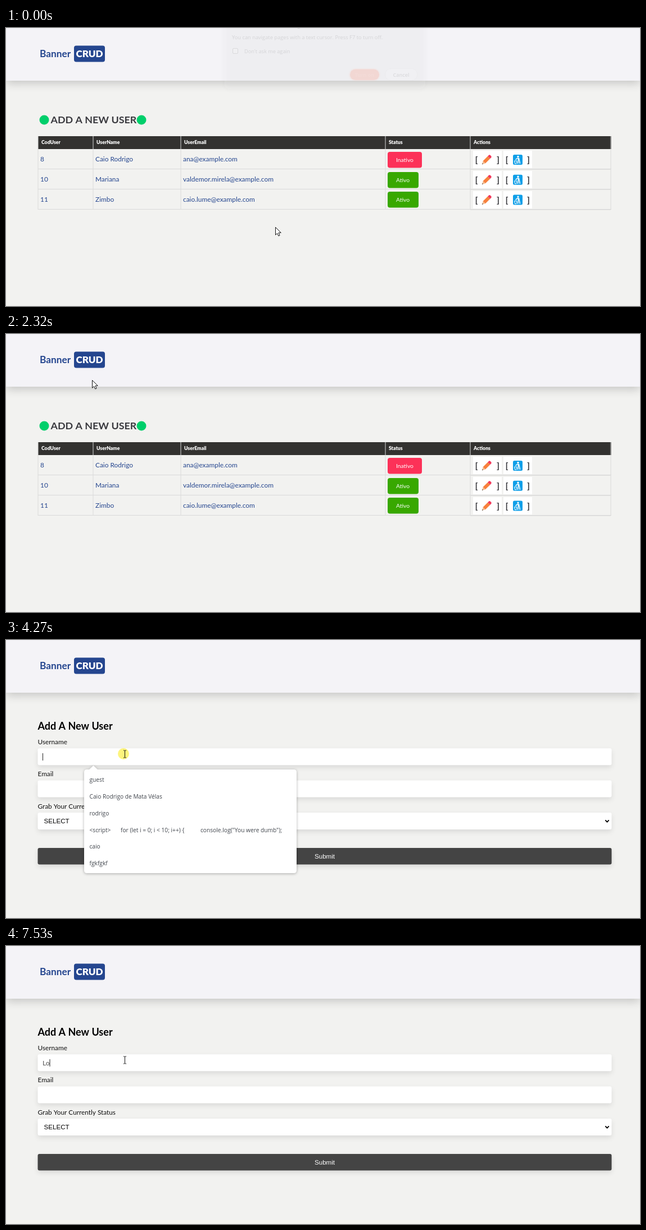
Recreate the animation shown at these times as an HTML page with a canvas. Size 1128 px wide and 496 px high, loop 7.99 s.

```html
<!DOCTYPE html>
<html lang="en">
<head>
<meta charset="utf-8">
<title>User list and form</title>
<style>
html, body { margin: 0; width: 100%; height: 100%; overflow: hidden; background: #f2f2f0; }
canvas { display: block; }
</style>
</head>
<body>
<canvas id="stage" width="1128" height="496"></canvas>
<script>
const ctx = document.getElementById('stage').getContext('2d');
const LOOP = 7990;
const LATO = 'Lato, sans-serif', OPEN = '"Open Sans", sans-serif', ARIAL = '"Liberation Sans", Arial, sans-serif';
const NAVY = '#25468f', BODY = '#f2f2f0';

const users = [
  ['8', 'Caio Rodrigo', 'ana@example.com', false],
  ['10', 'Mariana', 'valdemor.mirela@example.com', true],
  ['11', 'Zimbo', 'caio.lume@example.com', true],
];
const suggestions = ['guest', 'Caio Rodrigo de Mata Vélas', 'rodrigo', '<script>', 'caio', 'fgkfgkf'];

// Pointer stops: time, x, y, shape
const stops = [
  [0, 479, 355, 'arrow'], [69, 479, 355, 'arrow'], [70, 474, 348, 'arrow'], [150, 474, 348, 'arrow'],
  [400, 345, 250, 'arrow'], [700, 560, 130, 'arrow'], [950, 700, 80, 'arrow'], [1090, 703, 82, 'arrow'],
  [1300, 669, 89, 'arrow'], [1660, 165, 47, 'hand'], [1710, 144, 45, 'hand'], [1900, 144, 45, 'hand'],
  [1920, 150, 41, 'hand'], [2200, 150, 41, 'hand'], [2280, 152, 62, 'arrow'], [2460, 158, 150, 'hand'],
  [2660, 162, 161, 'hand'], [2920, 162, 164, 'hand'], [3010, 180, 185, 'arrow'], [3330, 300, 305, 'arrow'],
  [3400, 304, 302, 'beam'], [3530, 302, 280, 'beam'], [4140, 211, 203, 'beam'], [LOOP, 211, 203, 'beam'],
];
const clicks = [[1000, 1090], [2760, 2900], [4270, 4340]];
// Length of the typed word from each time on
const WORD = 'Lontra';
const typing = [[5900, 1], [6040, 2], [6110, 3], [6180, 4], [6250, 5], [6390, 6],
  [6720, 5], [6790, 4], [6860, 3], [6930, 2], [7060, 1], [7460, 2]];

const shapes = {
  arrow: new Path2D('M.5.5V14.2L3.7 11.3 5.8 16 8.1 15 6 10.3H10.3Z'),
  hand: new Path2D('M-2 2Q-2 0-.3 0T1.5 2V7Q3.5 6 4.5 7.6 6.5 7 7.2 8.8 9 8.6 9 11V14Q9 17 7 19.5H-.5Q-2 16-5.5 12.5-6 10-2 12Z'),
  beam: new Path2D('M-2.5-6.5H-.8L0-6 .8-6.5H2.5M0-6V6M-2.5 6.5H-.8L0 6 .8 6.5H2.5'),
  bubble: new Path2D('M144 231H148L155.500 224 163 231H512Q517 231 517 236V411Q517 416 512 416H144Q139 416 139 411V236Q139 231 144 231Z'),
};

function text(str, x, y, size, color, weight = 400, family = LATO, align = 'left') {
  ctx.font = `${weight} ${size}px ${family}`;
  ctx.fillStyle = color;
  ctx.textAlign = align;
  ctx.fillText(str, x, y);
}
function rect(x, y, w, h, color) {
  ctx.fillStyle = color;
  ctx.fillRect(x, y, w, h);
}
function box(x, y, w, h, r, color, stroke) {
  ctx.beginPath();
  ctx.roundRect(x, y, w, h, r);
  ctx.fillStyle = color;
  ctx.fill();
  if (stroke) { ctx.strokeStyle = stroke; ctx.lineWidth = 1; ctx.stroke(); }
}
function dot(x, y, r, color) {
  ctx.beginPath();
  ctx.arc(x, y, r, 0, 7);
  ctx.fillStyle = color;
  ctx.fill();
}
function line(color, width, ...points) {
  ctx.beginPath();
  for (const [x, y] of points) ctx.lineTo(x, y);
  ctx.strokeStyle = color;
  ctx.lineWidth = width;
  ctx.stroke();
}
function withShadow(dy, blur, alpha, draw) {
  ctx.save();
  ctx.shadowOffsetY = dy;
  ctx.shadowBlur = blur;
  ctx.shadowColor = `rgba(0,0,0,${alpha})`;
  draw();
  ctx.restore();
}

function drawHeader() {
  rect(0, 0, 1128, 496, BODY);
  withShadow(4, 16, .2, () => rect(0, 0, 1128, 94, '#f4f3f7'));
  text('Banner', 60, 52, 17.3, NAVY, 700);
  box(121, 31.5, 55, 29, 4, NAVY);
  text('CRUD', 148.5, 52, 17.1, '#fff', 900, LATO, 'center');
}

function drawPencil(x, y) {
  ctx.save();
  ctx.translate(x, y);
  ctx.rotate(-Math.PI / 4);
  rect(-6, -3, 12, 6, '#f7803c');
  box(6, -3, 4.5, 6, [0, 2, 2, 0], '#f2385a');
  ctx.beginPath();
  ctx.moveTo(-6, -3); ctx.lineTo(-11, 0); ctx.lineTo(-6, 3);
  ctx.fillStyle = '#f3b98c';
  ctx.fill();
  dot(-10.2, 0, .9, '#665544');
  ctx.restore();
}
function drawBin(x, y) {
  box(x - 8.5, y - 9, 17, 18, 2.5, '#0f9fe8');
  dot(x + .5, y - 5.5, 1.7, '#fff');
  line('#fff', 1.5, [x - 4, y], [x - 1, y - 2.5], [x + 2, y - 2.5], [x + 3, y + 2], [x + 4, y + 7]);
  line('#fff', 1.5, [x + 1, y - 2], [x + 1, y + 2], [x, y + 7]);
  line('#fff', 1, [x - 6, y + 2], [x - 5, y + 7], [x - 2.500, y + 7], [x - 1.5, y + 2], [x - 6, y + 2]);
}

function drawList() {
  const columns = [57, 155, 311, 675, 826, 1076];
  dot(68, 164, 8.5, '#00cf6b');
  dot(241, 164, 8.5, '#00cf6b');
  text('ADD A NEW USER', 79.5, 170, 17.9, '#3a3a3f', 700);
  rect(57, 193, 1020, 23, '#333230');
  ['CodUser', 'UserName', 'UserEmail', 'Status', 'Actions'].forEach((label, i) =>
    text(label, columns[i] + 6, 207, 8.7, '#fff', 900));
  columns.forEach(x => rect(x - .5, 193, 1, 131, '#dadada'));

  users.forEach(([id, name, email, active], i) => {
    const y = 216 + i * 35.8, mid = y + 18.7;
    rect(57, Math.round(y + 35), 1020, 1, '#dadada');
    rect(826, Math.round(y + 36), 250, 1, '#e2e2e0');
    text(id, 61, mid + 3.500, 11.9, NAVY);
    text(name, 159, mid + 3.5, 11.9, NAVY);
    text(email, 315, mid + 3.5, 11.9, NAVY);
    box(679, Math.round(mid - 14), active ? 55 : 61, 28.5, 4, active ? '#38a800' : '#fc3158');
    text(active ? 'Ativo' : 'Inativo', 694, mid + 4, 10.3, '#fff');
    for (const x of [831, 885]) {
      rect(x, Math.round(mid - 15.5), 51, 31, '#fff');
      text('[', x + 3.5, mid + 5.5, 16, '#3a3a3f', 700);
      text(']', x + 47, mid + 5.5, 16, '#3a3a3f', 700, LATO, 'right');
    }
    drawPencil(855, mid + .5);
    drawBin(910.5, mid + .3);
  });
}

function drawDialog(alpha) {
  ctx.save();
  ctx.globalAlpha = alpha;
  withShadow(1, 8, .25, () => box(388.5, -20, 357.5, 129, 9, '#fff'));
  text('Turn on caret browsing?', 402, -2, 11, '#222', 600, OPEN);
  text('You can navigate pages with a text cursor. Press F7 to turn off.', 402, 20, 9.3, '#222', 400, OPEN);
  box(403.5, 36.5, 9, 9, 1.5, '#fff', '#444');
  text("Don't ask me again", 424, 44.5, 9.2, '#222', 400, OPEN);
  box(610, 71.500, 56, 23.5, 12, '#fbc4b4');
  box(612, 73.5, 52, 19.5, 10, '#fb542b');
  text('Turn on', 638, 86.5, 9, '#fff', 700, OPEN, 'center');
  box(674.5, 72.5, 57.5, 21, 10.5, '#fff', '#ccc');
  text('Cancel', 703, 86.5, 9, '#444', 600, OPEN, 'center');
  ctx.restore();
}

function drawForm(t) {
  text('Add A New User', 56.5, 160, 18, '#000', 700);
  ['Username', 'Email', 'Grab Your Currently Status'].forEach((label, i) => {
    const y = 193.3 + i * 57.3;
    text(label, 56.5, y - 7.3, 11.8, '#111');
    withShadow(4, 10, .1, () => box(56.5, y, 1021, 30, 3, '#fff'));
  });
  text('SELECT', 67.500, 327, 11.6, '#000', 400, ARIAL);
  line('#000', 1.8, [1066.3, 321.3], [1069.5, 324.7], [1072.7, 321.3]);
  withShadow(4, 10, .1, () => box(56.5, 371, 1021, 29.5, 3, '#444'));
  text('Submit', 567, 390, 11.6, '#fff', 400, ARIAL, 'center');
  if (t < 4140) rect(0, 495, 186, 1, '#d6d6d6');
  if (t < 4270) return;

  const [, length] = typing.findLast(([start]) => t >= start) || [0, 0];
  const typed = WORD.slice(0, length);
  text(typed, 65, 212.5, 12, '#555');
  const caretOff = t >= 4820 && t < 5350;
  if (!caretOff) rect(Math.round(65 + ctx.measureText(typed).width) - (length ? .5 : 0), 202, 1, 13, '#222');
}

function drawSuggestions(t) {
  const fade = Math.max(0, (t - 5900) / 163);
  if (t < 4270 || fade >= 1) return;
  const scale = 1 - .047 * fade;
  ctx.save();
  ctx.globalAlpha = 1 - fade;
  ctx.translate(328, 323.5);
  ctx.scale(scale, scale);
  ctx.translate(-328, -323.5);
  withShadow(1, 5, .3, () => { ctx.fillStyle = '#fff'; ctx.fill(shapes.bubble); });
  const item = (str, x, row) => text(str, x, 253 + row * 29.85, 10.2, '#40454c', 400, OPEN);
  suggestions.forEach((str, row) => item(str, 148.5, row));
  item('for (let i = 0; i < 10; i++) {', 204, 3);
  item('console.log("You were dumb");', 346, 3);
  ctx.restore();
}

function drawPointer(t) {
  const next = Math.max(1, stops.findIndex(([time]) => time > t));
  const [t0, x0, y0, shape] = stops[next - 1], [t1, x1, y1] = stops[next];
  const k = (t - t0) / (t1 - t0);
  const x = x0 + (x1 - x0) * k, y = y0 + (y1 - y0) * k;
  if (clicks.some(([from, to]) => t >= from && t < to)) dot(x - 2, y, 10, 'rgba(252,240,75,.72)');
  ctx.save();
  ctx.translate(Math.round(x), Math.round(y));
  ctx.lineWidth = 1;
  ctx.strokeStyle = '#111';
  ctx.fillStyle = '#fff';
  if (shape !== 'beam') ctx.fill(shapes[shape]);
  else ctx.translate(.5, .5);
  ctx.stroke(shapes[shape]);
  ctx.restore();
}

function draw(t) {
  drawHeader();
  if (t < 3400) {
    drawList();
    const alpha = t < 70 ? .12 : Math.min(1, (1190 - t) / 100);
    if (alpha > 0) drawDialog(alpha);
  } else {
    drawForm(t);
    drawSuggestions(t);
  }
  drawPointer(t);
}

const start = performance.now();
function tick() {
  draw((performance.now() - start) % LOOP);
  requestAnimationFrame(tick);
}
tick();
</script>
</body>
</html>
```
